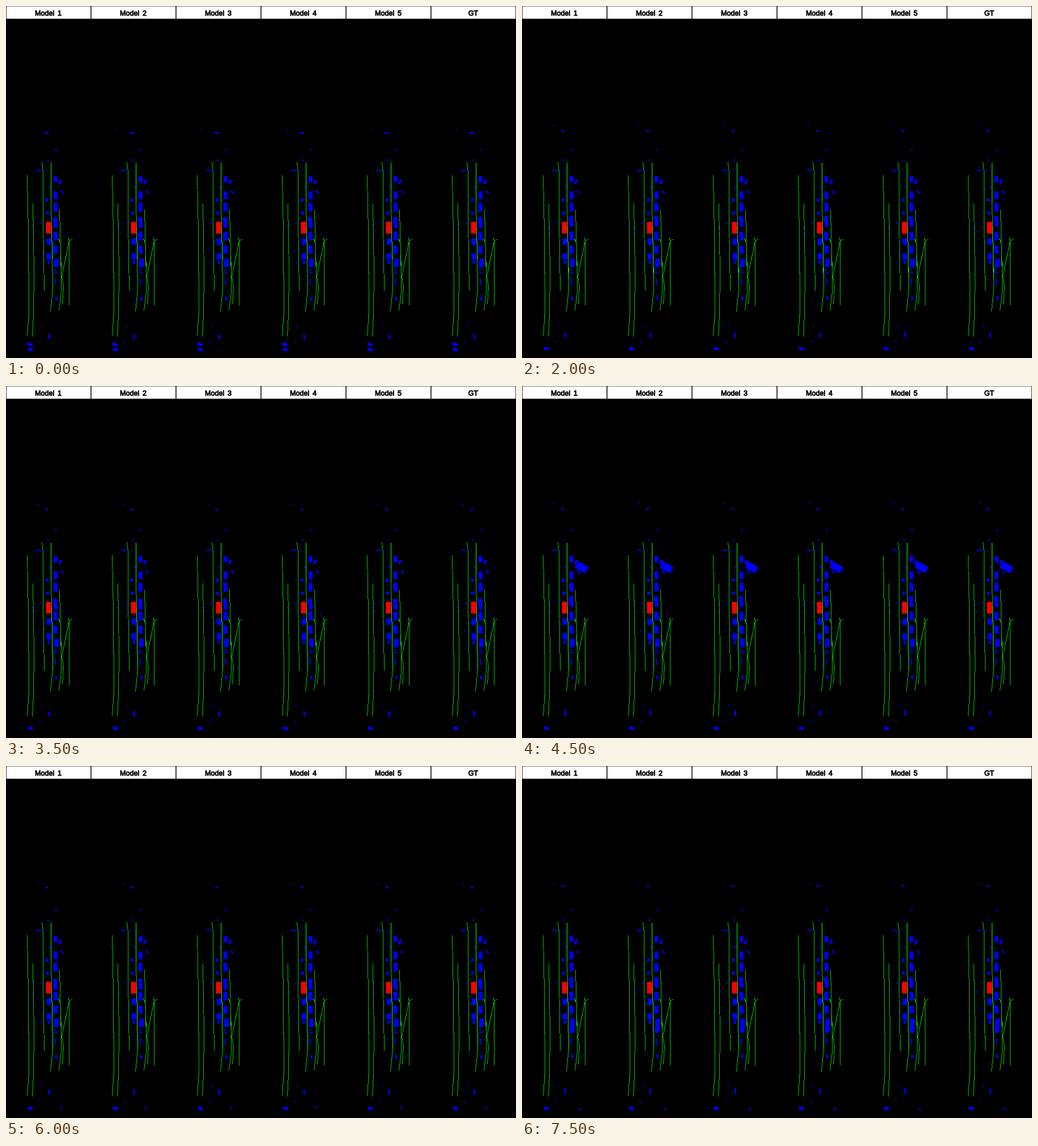
An HTML page that plays this animation: 900x622 px, repeating every 8 s.

```html
<!DOCTYPE html>
<html lang="en">
<head>
<meta charset="utf-8">
<title>Model comparison</title>
<style>
html, body { margin: 0; width: 100%; height: 100%; overflow: hidden; background: #000; }
svg { display: block; width: 900px; height: 622px; }
text { font: 12.6px "Liberation Sans", Arial, sans-serif; text-anchor: middle; word-spacing: 2px; stroke: #000; stroke-width: .9px; }
.lane { fill: none; stroke: #00c800; shape-rendering: crispEdges; }
.bright { stroke: #0f0; }
.marks { fill: none; stroke: #00f; stroke-width: 2px; }
</style>
</head>
<body>
<svg viewBox="0 0 900 622">
  <defs>
    <g id="scene">
      <g id="fixed" fill="#00f"></g>
      <g id="moving" fill="#00f"></g>
      <rect x="70.5" y="381.5" width="9" height="20.5" fill="#f00"/>
      <g transform="translate(.5 .5)">
        <path class="lane" d="M37,299L39,400L40,540L37,583 M47,349L49,470L48,545L46,584
          M63,276L65,292V380L67,503 M79,276V345L81,440L82,500L78,540
          M94,360L97,478V505L93,538 M110,409L111,415L117,411
          M111,414L98,478L101,495L99,527 M111,411V528 M92,411L96,419"/>
        <path id="overlap" class="lane bright"/>
      </g>
      <g id="flicker" fill="#06d"></g>
    </g>
  </defs>
  <g id="panels"></g>
</svg>
<script>
const STEP = 500, STEPS = 16;
const byId = id => document.getElementById(id);

const box = (x, y, w, h, angle = 0) =>
  `<rect x="${x - w / 2}" y="${y - h / 2}" width="${w}" height="${h}" transform="rotate(${angle} ${x} ${y})"/>`;

function seeded(seed) {
  return () => {
    const v = Math.sin(seed++ * 12.9898) * 43758.5453;
    return v - Math.floor(v);
  };
}

function fixedScene() {
  const rightRow = [306, 334.5, 355.5, 406.5, 430.5].map((y, i) =>
    box(87.2, y, 6.5 + i * .2, 11 + 5 * Math.sin(Math.PI * i / 5), -i));
  const leftRow = [416.5, 442.5].map(y => box(75.5, y, 8, 11.5, -2));
  const small = [343, 366, 453].map(y => box(72.5 + (y - 343) * .028, y, 5, 5.5, 15));
  const barriers = [box(95.3, 311, 4, 8, 30), box(99.5, 329, 2.5, 7, -40)];
  const marks = `<path class="marks" d="M53,290.5h10 M72,272.5h4 M71,291h2 M77,318v4
    M60,383.5h3 M104,404h2 M86,254l4,1 M58,433h2 M61,454.5h2 M51,399h2
    M84,467h5 M85,471h6 M59,593h2 M63,565h2"/>`;
  return [...rightRow, ...leftRow, ...small, ...barriers, marks].join('');
}

function movingScene(step) {
  const settle = span => Math.exp(-step / span);
  const truckSeen = step > 1 && (step % 4 === 1 || step % 4 === 2);
  const tail = step % 9 === 6 ? 24 : 15;
  const shapes = [
    box(72, 224 - step * .8, 5 + 3 * settle(2), 2.5, 18 * Math.cos(step * Math.PI / 7.5) - 8),
    box(57 - 11 * settle(2), 207 + 11 * settle(4), 3, 1.2, 10),
    box(76.3, 584.5 - step * .68, 3, 9, -6),
    box(88.7, 517.5 - step * .3, 4, 6, -15),
    box(87, 487, 2, 12, -3),
    box(87, 383.3 - 2.7 * Math.cos((step - 4) * Math.PI / 2.5), 7, 19, -4),
    box(89, 446.5 + tail / 2, 8, tail, 3),
    box(43, 605 + 2 * settle(3), 9, 5, 14)
  ];
  if (step < 2) shapes.push(box(42, 598, 9, 5, 30));
  if (truckSeen) shapes.push(box(105, 320.5, 21, 12.5, 28));
  if (step > 11) shapes.push(box(97.5 + (step - 12) * 1.5, 603.5 + step - 12, 4, 2.5, 10));
  return shapes.join('');
}

function drawStep(step) {
  const random = seeded(step * 31 + 1);
  byId('moving').innerHTML = movingScene(step);
  byId('flicker').innerHTML = Array.from({ length: 6 }, () =>
    box(47 + random() * 2, 378 + random() * 26, 1, 2)).join('');
  byId('overlap').setAttribute('d',
    `M79,276V345M80,390L81,440L82,${Math.min(500, 446 + 9 * step)}M96,440L97,462`);
}

byId('fixed').innerHTML = fixedScene();
byId('panels').innerHTML = ['Model 1', 'Model 2', 'Model 3', 'Model 4', 'Model 5', 'GT'].map((name, i) =>
  `<g transform="translate(${i * 150})"><rect x=".75" y=".5" width="148.5" height="22" fill="#fff"/>
   <text x="74.5" y="17">${name}</text><use href="#scene"/></g>`).join('');

let shown = -1;
function tick() {
  const step = Math.floor(performance.now() / STEP) % STEPS;
  if (step !== shown) drawStep(shown = step);
  requestAnimationFrame(tick);
}
tick();
</script>
</body>
</html>
```
